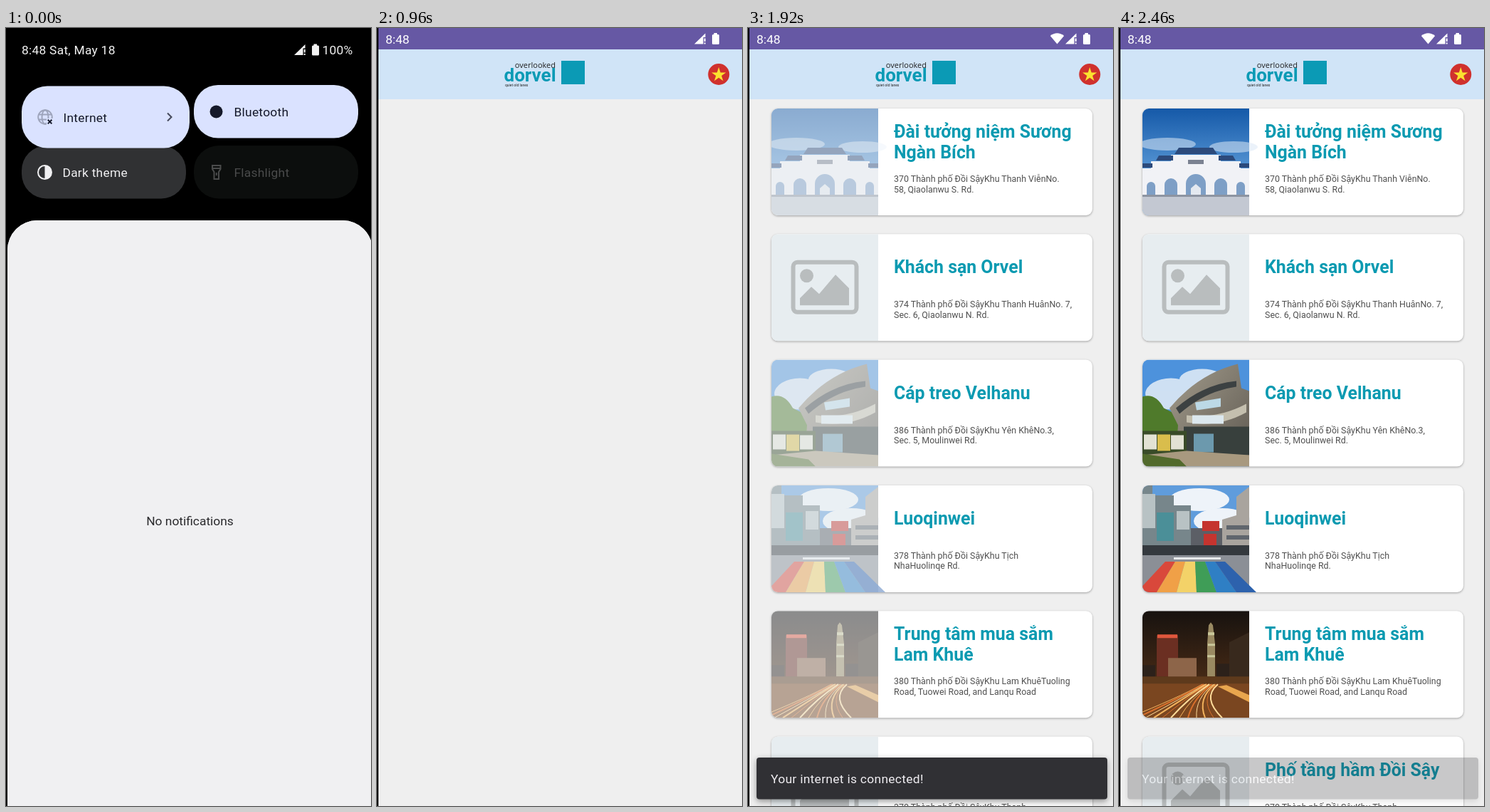
Recreate the animation shown at these times as an HTML page. Size 513x1092 px, loop 2.52 s.

```html
<!DOCTYPE html>
<html lang="vi">
<head>
<meta charset="utf-8">
<title>Travel list</title>
<style>
html, body { margin: 0; width: 100%; height: 100%; overflow: hidden; background: #000; }
svg { display: block; width: 100%; height: 100%; }
text { font: 17.4px Roboto, sans-serif; }
.wide { letter-spacing: .25px; }
.title { font-size: 24.86px; font-weight: 700; fill: #0b9ab1; }
.address { font-size: 12.43px; fill: #505050; }
.raised { filter: drop-shadow(0 1px 1.5px #0005); }
</style>
</head>
<body>
<svg viewBox="0 0 513 1092">
  <defs>
    <clipPath id="cardClip"><rect width="451" height="150" rx="9"/></clipPath>
    <linearGradient id="daySky" x2="0" y2="1"><stop stop-color="#1559a8"/><stop offset=".75" stop-color="#6aa8e2"/></linearGradient>
    <linearGradient id="nightSky" x2="0" y2="1"><stop stop-color="#17120f"/><stop offset=".7" stop-color="#4a2c16"/></linearGradient>
    <linearGradient id="wall" x2="1" y2="1"><stop stop-color="#a39c8c"/><stop offset="1" stop-color="#5d5850"/></linearGradient>

    <g id="signal">
      <path d="M446 22.5L461.5 7.5V13H458.5V22.5Z"/>
      <path d="M459.7 14.5h2v4.5h-2zM459.7 20.5h2v2h-2z"/>
    </g>
    <path id="battery" d="M473.5 7h4.5v2h1.5q1.5 0 1.5 1.5v11q0 1.5-1.5 1.5h-7q-1.5 0-1.5-1.5v-11q0-1.5 1.5-1.5h1z"/>

    <g id="placeholder" fill="#b9bdbe">
      <rect x="30.5" y="39.5" width="89" height="70" rx="6" fill="none" stroke="#b9bdbe" stroke-width="6"/>
      <circle cx="49.5" cy="58.5" r="9.5"/>
      <path d="M40 100V90L56 74L67 84L90 57L109 76V100Z"/>
    </g>

    <g id="gate">
      <rect width="150" height="150" fill="url(#daySky)"/>
      <g fill="#dbe8f6" opacity=".55"><ellipse cx="35" cy="50" rx="40" ry="9"/><ellipse cx="128" cy="54" rx="34" ry="8"/></g>
      <path d="M0 100H150V124H0Z" fill="#5f7464"/>
      <path d="M0 122H150V150H0Z" fill="#c3c8d2"/>
      <path d="M0 84H12V74H40V65H110V74H138V84H150V122H0Z" fill="#f1f2f6"/>
      <path d="M45 64L51 55H99L105 64ZM19 73L23 66H43V73ZM107 73V66H127L131 73ZM0 83V77H14V83ZM136 83V77H150V83Z" fill="#2c4a7b"/>
      <path d="M61 122V106a14 14 0 0 1 28 0V122ZM31 122V107a9 9 0 0 1 18 0V122ZM101 122V107a9 9 0 0 1 18 0V122ZM6 122V109a6 6 0 0 1 12 0V122ZM132 122V109a6 6 0 0 1 12 0V122Z" fill="#7e9fc6"/>
      <path d="M68 122V112L75 106L82 112V122Z" fill="#e4e9f0"/>
      <path d="M0 121H150V124H0Z" fill="#8d94a1"/>
      <rect x="64" y="72" width="22" height="6" fill="#7b8291"/>
    </g>

    <g id="station">
      <rect width="150" height="150" fill="#4d92dc"/>
      <g fill="#e6eef7" opacity=".85"><ellipse cx="40" cy="48" rx="36" ry="22"/><ellipse cx="84" cy="28" rx="32" ry="15"/></g>
      <path d="M0 52Q18 46 30 68L62 84V112H0Z" fill="#4f7a2b"/>
      <path d="M38 68Q78 20 134 6L139 40L150 44V150H46L50 92Z" fill="url(#wall)"/>
      <path d="M47 68Q86 34 132 30V38Q88 44 52 76Z" fill="#3c4142"/>
      <path d="M62 78Q104 84 146 62V74Q106 96 62 88Z" fill="#c4bfae"/>
      <path d="M74 60L110 54V66L76 71Z" fill="#bcd9e6"/>
      <path d="M58 94H150V134H58Z" fill="#38403d"/>
      <path d="M72 104H100V130H72Z" fill="#6c99ad"/>
      <path d="M70 78H114V90H70Z" fill="#dce8ee"/>
      <path d="M0 100H62V134H0Z" fill="#394b28"/>
      <path d="M2 105H20V126H2ZM40 106H58V126H40Z" fill="#e2e2d4"/><path d="M21 105H39V128H21Z" fill="#d9bd4c"/>
      <path d="M0 134L62 128L150 134V150H0Z" fill="#a8997f"/>
      <path d="M0 132L52 140L62 150H0Z" fill="#526a2c"/>
    </g>

    <g id="crossing">
      <rect width="150" height="150" fill="#5f9cdc"/>
      <g fill="#eef3f9"><ellipse cx="80" cy="20" rx="42" ry="16"/><ellipse cx="112" cy="50" rx="40" ry="18"/></g>
      <path d="M0 0H14V14H44V28H68V104H0Z" fill="#77868b"/>
      <path d="M0 12H18V60H0ZM48 36H66V62H48Z" fill="#b8c2c4"/>
      <path d="M20 38H44V78H20Z" fill="#4b8f98"/>
      <path d="M68 60H112V100H68Z" fill="#5c5f66"/>
      <path d="M84 50H108V64H84ZM86 68H104V86H86Z" fill="#c5342f"/>
      <path d="M150 2L132 16V42L112 48V100H150Z" fill="#a9a49e"/>
      <path d="M118 56H150V62H118ZM118 70H150V76H118Z" fill="#60666d"/>
      <path d="M0 84H150V100H0Z" fill="#34393e"/>
      <path d="M0 98H150V150H0Z" fill="#8b8f96"/>
      <path d="M44 101H110V104H44Z" fill="#e8eaec"/>
      <g id="stripes"></g>
    </g>

    <g id="night">
      <rect width="150" height="150" fill="url(#nightSky)"/>
      <path d="M91 92V46L93 20L96 16V6V16L99 20L102 46V92Z" fill="#9a8a62"/>
      <path d="M92 30H101V34H92ZM92 46H102V49H92ZM91 62H102V65H91Z" fill="#c9c79a"/>
      <path d="M20 34H50V92H20Z" fill="#6b2f22"/><path d="M21 33H49V38H21Z" fill="#e0573d"/>
      <path d="M122 44L150 30V104H122Z" fill="#38291d"/>
      <path d="M0 76H18V104H0ZM104 74H122V104H104Z" fill="#2c211a"/>
      <path d="M36 66H76V96H36Z" fill="#8d6549"/>
      <path d="M0 92H150V104H0Z" fill="#5e3a1c"/>
      <path d="M0 102H150V150H0Z" fill="#7a4620"/>
      <g id="trails" fill="none"></g>
      <path d="M118 104L150 118V128L106 106Z" fill="#e8a64e"/>
    </g>
  </defs>

  <g id="app">
    <rect width="513" height="1092" fill="#efefef"/>
    <rect width="513" height="30" fill="#6658a4"/>
    <rect y="30" width="513" height="70" fill="#d0e4f7"/>
    <text x="251" y="56" text-anchor="end" style="font:11px 'Open Sans',sans-serif" fill="#222">overlooked</text>
    <text x="178.5" y="75" style="font-size:26px;font-weight:700" fill="#0b9ab5">dorvel</text>
    <text x="180" y="81.5" style="font-size:5px" fill="#222">quiet old lanes</text>
    <rect x="259" y="46" width="33" height="33" fill="#0b9ab5"/>
    <circle cx="480.3" cy="65" r="15" fill="#d0312d"/>
    <polygon id="star" fill="#fbe22f"/>
    <g id="status" fill="#fff">
      <text x="12" y="21.5">8:48</text>
      <use href="#signal"/><use href="#battery"/>
      <path id="wifi" d="M434.5 22.5L424.8 11Q434.5 3.5 444.2 11Z"/>
    </g>
    <path id="spinner" fill="none" stroke="#605d71" stroke-width="6.2"/>
    <g id="list"></g>
    <g id="snackbar">
      <rect class="raised" x="12" y="1024" width="493" height="58.5" rx="4" fill="#303034" style="filter:drop-shadow(0 3px 4px #0006)"/>
      <text x="32" y="1060" fill="#efedf1" style="letter-spacing:.31px">Your internet is connected!</text>
    </g>
  </g>
  <rect width="2" height="1092"/>

  <g id="shade">
    <path id="backdrop" fill-rule="evenodd"/>
    <g id="tiles">
      <rect x="22" y="165" width="231" height="74.5" rx="35" fill="#303133"/>
      <rect x="22" y="81.500" width="236" height="87" rx="36" fill="#dae2ff"/>
      <rect x="264" y="80" width="231" height="74.5" rx="34" fill="#dae2ff"/>
      <rect x="264" y="165" width="231" height="74.5" rx="35" fill="#0c0e0d"/>
      <g class="wide">
        <text x="80.500" y="131.500" fill="#15192a">Internet</text>
        <text x="320.500" y="124" fill="#15192a">Bluetooth</text>
        <text x="79.500" y="209" fill="#f0f0f2">Dark theme</text>
        <text x="320.500" y="209" fill="#4a4b4b">Flashlight</text>
      </g>
      <g fill="none" stroke="#9da4bb" stroke-width="1.9">
        <circle cx="55" cy="125" r="9.8"/><ellipse cx="55" cy="125" rx="4.500" ry="9.8"/>
        <path d="M46 121.500H64M46 128.500H64"/>
      </g>
      <rect x="57" y="127" width="10" height="10" fill="#dae2ff"/>
      <path d="M58.800 128.800l5.600 5.600m0-5.600l-5.600 5.600" stroke="#15192a" stroke-width="2"/>
      <path d="M227 119.500l5.500 5.500-5.500 5.500" fill="none" stroke="#44485a" stroke-width="2"/>
      <circle cx="295.500" cy="117.500" r="9" fill="#15192a"/>
      <circle cx="54.500" cy="202.500" r="9.500" fill="none" stroke="#f0f0f2" stroke-width="2"/>
      <path d="M54.500 193a9.500 9.500 0 0 1 0 19z" fill="#f0f0f2"/>
      <path d="M290 193H301.500V198L299 202V212H292.500V202L290 198ZM290 197H301.500M295.800 203V207" fill="none" stroke="#4a4b4b" stroke-width="2"/>
    </g>
    <g id="shadeStatus" fill="#f2f2f2" class="wide">
      <text x="22" y="37">8:48 Sat, May 18</text>
      <text x="444.500" y="37">100%</text>
      <g transform="translate(-41 15.500)"><use href="#signal"/><use href="#battery"/></g>
    </g>
    <g id="panel">
      <path id="sheet" fill="#f0f0f2"/>
      <text id="empty" x="258.500" text-anchor="middle" fill="#2b2b2e">No notifications</text>
    </g>
  </g>
</svg>
<script>
const LOOP = 2520, STEP = 60;
const $ = id => document.getElementById(id);
const set = (id, attrs) => Object.entries(attrs).forEach(([k, v]) => $(id).setAttribute(k, v));
const ramp = (t, from, to) => Math.min(1, Math.max(0, (t - from) / (to - from)));
const show = (id, opacity) => set(id, { opacity, visibility: opacity > 0 ? 'visible' : 'hidden' });

const cards = [
  { photo: 'gate', title: ['Đài tưởng niệm Sương', 'Ngàn Bích'],
    address: ['370 Thành phố Đồi SậyKhu Thanh ViễnNo.', '58, Qiaolanwu S. Rd.'] },
  { title: ['Khách sạn Orvel'],
    address: ['374 Thành phố Đồi SậyKhu Thanh HuânNo. 7,', 'Sec. 6, Qiaolanwu N. Rd.'] },
  { photo: 'station', title: ['Cáp treo Velhanu'],
    address: ['386 Thành phố Đồi SậyKhu Yên KhêNo.3,', 'Sec. 5, Moulinwei Rd.'] },
  { photo: 'crossing', title: ['Luoqinwei'],
    address: ['378 Thành phố Đồi SậyKhu Tịch', 'NhaHuolinqe Rd.'] },
  { photo: 'night', title: ['Trung tâm mua sắm', 'Lam Khuê'],
    address: ['380 Thành phố Đồi SậyKhu Lam KhuêTuoling', 'Road, Tuowei Road, and Lanqu Road'] },
  { title: ['Phố tầng hầm Đồi Sậy'],
    address: ['370 Thành phố Đồi SậyKhu Thanh'] }
];

const lines = (rows, cls, y, gap) =>
  rows.map((row, i) => `<text class="${cls}" x="172" y="${y + i * gap}">${row}</text>`).join('');

$('list').innerHTML = cards.map(({ photo, title, address }, i) => `
  <g transform="translate(33 ${113 + i * 176.3})">
    <rect class="raised" width="451" height="150" rx="9" fill="#fff"/>
    <g clip-path="url(#cardClip)">
      <rect width="150" height="150" fill="#e7edf0"/>
      <use href="#placeholder" ${photo ? 'data-waiting' : ''}/>
      ${photo ? `<use href="#${photo}" data-photo/>` : ''}
    </g>
    ${lines(title, 'title', title.length > 1 ? 41 : 55, 29.2)}
    ${lines(address, 'address', 103, 14.6)}
  </g>`).join('');

$('stripes').innerHTML = ['#d9483b', '#f0a047', '#f3d268', '#3f9d57', '#2f7fc4', '#2d62ad'].map((color, i) => {
  const near = -8 + i * 28, far = 32 + i * 14;
  return `<path fill="${color}" d="M${near} 150L${far} 107H${far + 14}L${near + 28} 150Z"/>`;
}).join('');

$('trails').innerHTML = Array.from({ length: 12 }, (_, i) =>
  `<path d="M${-20 + i * 12} 150Q${50 + i * 3} 122 ${84 + i * 2} 103" stroke="${['#f3b25c', '#d9702c', '#ffdc9a'][i % 3]}" stroke-width="${1 + i % 2}"/>`
).join('');

set('star', { points: Array.from({ length: 10 }, (_, i) => {
  const r = i % 2 ? 4.1 : 10.7, a = i * Math.PI / 5 - Math.PI / 2;
  return [480.3 + r * Math.cos(a), 65.7 + r * Math.sin(a)];
}).join(' ') });

// cubic-bezier(.4, 0, .2, 1)
function fastOutSlowIn(x) {
  let lo = 0, hi = 1;
  for (let i = 0; i < 20; i++) {
    const u = (lo + hi) / 2, v = 1 - u;
    if (1.2 * v * v * u + .6 * v * u * u + u ** 3 < x) lo = u; else hi = u;
  }
  return 3 * lo * lo - 2 * lo ** 3;
}

function drawSpinner(ms) {
  const turn = -90 + ms * 1520 / 5400;
  const tail = turn - 20 + 250 * fastOutSlowIn(ramp(ms, 667, 1334));
  const head = turn + 250 * fastOutSlowIn(ramp(ms, 0, 667));
  const point = deg => {
    const a = deg * Math.PI / 180;
    return `${258.5 + 28.4 * Math.cos(a)} ${560.7 + 28.4 * Math.sin(a)}`;
  };
  set('spinner', { d: `M${point(tail)}A28.4 28.4 0 ${+(head - tail > 180)} 1 ${point(head)}` });
}

const panelTops = [270, 262, 238, 175, 80, 24];

function drawShade(t) {
  const open = t < panelTops.length * STEP;
  show('shade', +open);
  if (!open) return;
  const top = panelTops[t / STEP], r = 20 + top * .08;
  const sheet = `M2 1092V${top + r}a${r} ${r} 0 0 1 ${r} ${-r}H${515 - r}a${r} ${r} 0 0 1 ${r} ${r}V1092Z`;
  set('backdrop', { d: `M0 0H513V1092H0Z${sheet}` });
  set('sheet', { d: sheet });
  set('empty', { y: 698 - (270 - top) / 2 });
  set('tiles', { transform: `translate(0 ${(top - 270) * .3})` });
  show('tiles', 1 - ramp(t, 60, 240));
  show('shadeStatus', 1 - ramp(t, 120, 300));
  show('panel', 1 - ramp(t, 180, 300));
}

function draw(t) {
  drawShade(t);
  show('status', ramp(t, 300, 480));
  show('wifi', +(t >= 1140));

  const listed = t >= 1620;
  show('spinner', +(t >= 1080 && !listed));
  if (t >= 1080) drawSpinner(t - 1066);

  show('list', +listed);
  const loaded = ramp(t, 1800, 2070);
  document.querySelectorAll('[data-photo]').forEach(el => el.setAttribute('opacity', loaded));
  document.querySelectorAll('[data-waiting]').forEach(el => el.setAttribute('opacity', Math.max(0, 1 - loaded * 2.5)));

  const enter = ramp(t, 960, 1110), scale = .8 + .2 * enter;
  show('snackbar', enter * (1 - .74 * ramp(t, 2400, 2460)));
  set('snackbar', { transform: `translate(258.5 1053) scale(${scale}) translate(-258.5 -1053)` });
}

function tick(now) {
  draw(Math.floor(now % LOOP / STEP) * STEP);
  requestAnimationFrame(tick);
}
draw(0);
requestAnimationFrame(tick);
</script>
</body>
</html>
```
